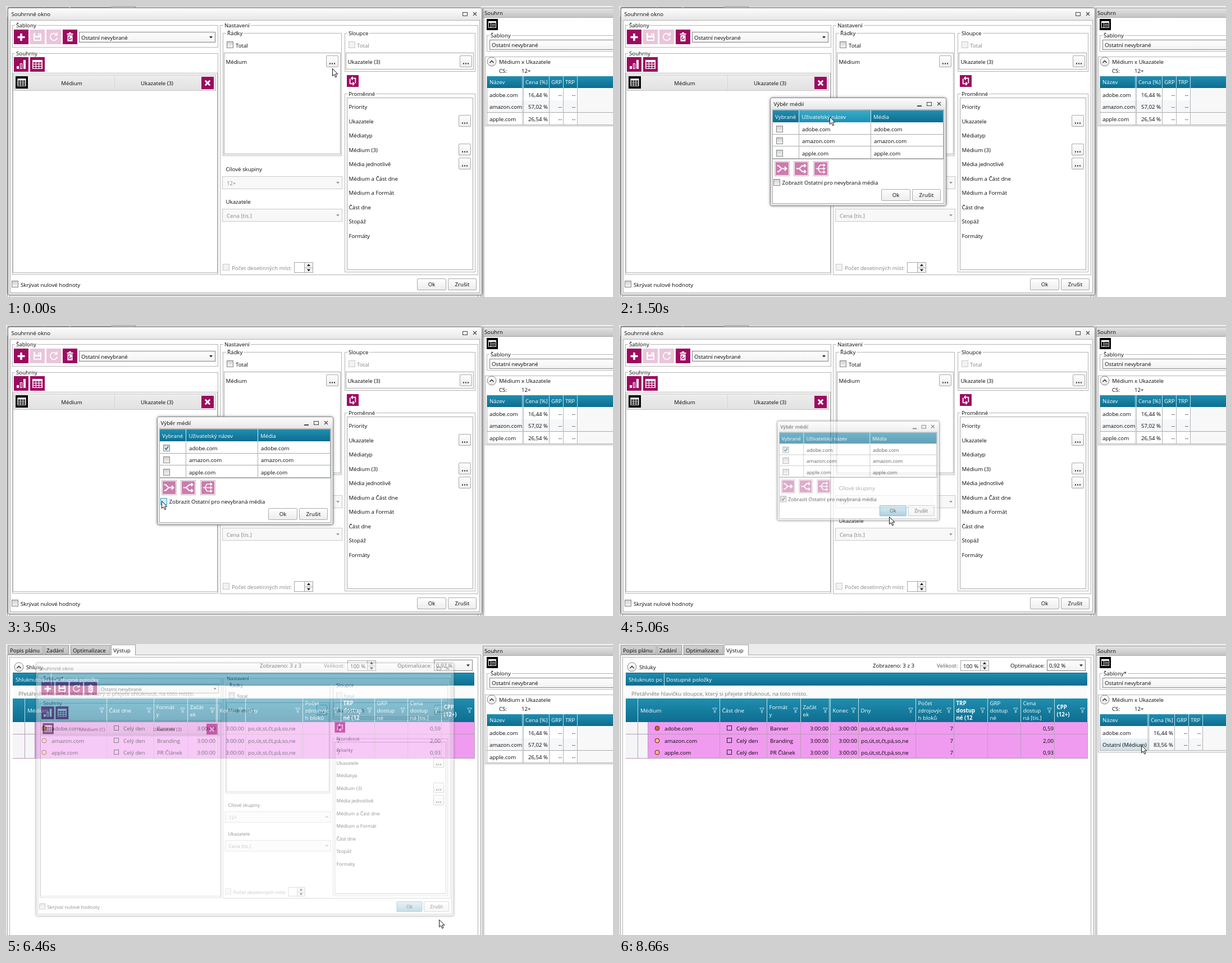
These frames come from a looping animation (1081 by 518 pixels, 8.92 s). An HTML page with a canvas:

```html
<!DOCTYPE html>
<html lang="cs">
<head>
<meta charset="utf-8">
<style>
html, body { margin: 0; width: 100%; height: 100%; overflow: hidden; background: #fff; }
canvas { display: block; }
</style>
</head>
<body>
<canvas id="stage" width="1081" height="518"></canvas>
<script>
const W = 1081, H = 518, LOOP = 8920;
const screen = document.getElementById('stage').getContext('2d');
const layer = document.createElement('canvas');
layer.width = W; layer.height = H;
const layerCtx = layer.getContext('2d');
let c = screen, pointer = [0, 0], modal = false;

const INK = '#080808', DIM = '#858585', LINE = '#b4b4b4', PLUM = '#9c0a60';
const SITES = ['adobe.com', 'amazon.com', 'apple.com'];

// Pointer stops: time, x, y
const PATH = [
  [190, 581, 111], [420, 578, 99], [1110, 578, 100], [1500, 375, 197], [1860, 286, 217],
  [2050, 284, 219], [2200, 283, 219], [2600, 283, 220], [3290, 278, 297], [3390, 269, 306],
  [3500, 277, 313], [4060, 277, 313], [4720, 481, 341], [5130, 481, 341], [5690, 818, 446],
  [5760, 816, 452], [6080, 766, 502], [6380, 766, 502], [6650, 786, 457], [6730, 789, 450],
  [7540, 930, 180], [7680, 931, 180], [8020, 966, 180], [8180, 966, 180], [8520, 931, 181], [8660, 930, 180]
];

const clamp = v => Math.max(0, Math.min(1, v));
const ramp = (t, a, b) => clamp((t - a) / (b - a));

function pointerAt(t) {
  const i = PATH.findIndex(p => p[0] > t);
  if (i === 0) return PATH[0].slice(1);
  if (i < 0) return PATH[PATH.length - 1].slice(1);
  const [t0, x0, y0] = PATH[i - 1], [t1, x1, y1] = PATH[i];
  const u = ramp(t, t0, t1), k = (u + u * u * (3 - 2 * u)) / 2;
  return [x0 + (x1 - x0) * k, y0 + (y1 - y0) * k];
}

const over = (x, y, w, h) => !modal && pointer[0] >= x && pointer[0] < x + w && pointer[1] >= y && pointer[1] < y + h;

function rect(x, y, w, h, fill, stroke) {
  if (fill) { c.fillStyle = fill; c.fillRect(x, y, w, h); }
  if (stroke) { c.strokeStyle = stroke; c.lineWidth = 1; c.strokeRect(x + .5, y + .5, w - 1, h - 1); }
}
function shade(y, h, top, bottom) {
  const g = c.createLinearGradient(0, y, 0, y + h);
  g.addColorStop(0, top); g.addColorStop(1, bottom);
  return g;
}
// y is the middle of the text line
function text(s, x, y, color = INK, align = 'left', weight = '') {
  c.font = `${weight} 9.7px "Open Sans", "Noto Sans", sans-serif`;
  c.textAlign = align;
  c.fillStyle = color;
  c.fillText(s, x, Math.round(y + 3.5));
}
function path(d, x, y, { stroke, fill, width = 1 }) {
  c.save();
  c.translate(x, y);
  const p = new Path2D(d);
  if (fill) { c.fillStyle = fill; c.fill(p); }
  if (stroke) { c.strokeStyle = stroke; c.lineWidth = width; c.stroke(p); }
  c.restore();
}
function group(x, y, w, h, label, lx) {
  rect(x, y, w, h, null, LINE);
  c.font = '9.7px "Open Sans", "Noto Sans", sans-serif';
  rect(lx - 2, y - 1, c.measureText(label).width + 4, 3, '#fff');
  text(label, lx, y);
}
function button(x, y, w, h, label, focus) {
  const hot = over(x, y, w, h);
  c.beginPath();
  c.roundRect(x + .5, y + .5, w - 1, h - 1, 1.5);
  c.fillStyle = hot ? shade(y, h, '#cfe4ec', '#82b6ca') : shade(y, h, '#fff', '#ececec');
  c.fill();
  c.strokeStyle = hot || focus ? '#2fa3cd' : '#a9a9a9';
  c.lineWidth = 1;
  c.stroke();
  if (label) return text(label, x + w / 2, y + h / 2, INK, 'center');
  for (let i = -1; i < 2; i++) rect(x + w / 2 - 1 + i * 4, y + h / 2 + 3, 2, 2, '#222');
}
function checkbox(x, y, checked, disabled) {
  const hot = !disabled && over(x, y, 12, 12);
  const fill = hot ? '#d5ecf7' : disabled ? '#f2f2f2' : shade(y, 12, '#cfcfcf', '#f6f6f6');
  rect(x, y, 12, 12, fill, hot ? '#2fa3cd' : disabled ? '#c8c8c8' : '#858585');
  if (checked) path('M3 6L5.2 8.6L9 3.2', x, y, { stroke: '#2b6b96', width: 1.6 });
}
function combo(x, y, w, h, label, disabled) {
  rect(x, y, w, h, disabled ? '#f8f8f8' : shade(y, h, '#fff', '#f1f1f1'), disabled ? '#c9c9c9' : '#828282');
  text(label, x + (disabled ? 8 : 4), y + h / 2 + .5, disabled ? DIM : INK);
  path('M-3 -1.5H3L0 2Z', x + w - 8, y + h / 2, { fill: disabled ? '#999' : '#222' });
}
function spinner(x, y, w, h, label) {
  rect(x, y, w, h, '#fff', '#a9a9a9');
  rect(x + w - 16, y, 16, h, '#f3f3f3', '#a9a9a9');
  rect(x + w - 16, y + h / 2, 16, 1, '#a9a9a9');
  path('M-3 2L0 -2L3 2Z', x + w - 8, y + 5, { fill: '#222' });
  path('M-3 -2L0 2L3 -2Z', x + w - 8, y + h - 4.5, { fill: '#222' });
  text(label, x + 5, y + h / 2 + .5);
}
function expander(x, y) {
  c.beginPath();
  c.arc(x, y, 8, 0, 7);
  c.fillStyle = shade(y - 8, 16, '#fff', '#e4e4e4');
  c.fill();
  c.strokeStyle = '#888'; c.lineWidth = 1;
  c.stroke();
  path('M-3.5 2L0 -1.5L3.5 2', x, y, { stroke: '#222', width: 1.3 });
}
function blue(x, y, w, h) {
  const hot = over(x, y, w, h) && c === layerCtx;
  rect(x, y, w, h, hot ? shade(y, h, '#38abc9', '#1c91b5') : shade(y, h, '#1f8eb0', '#0e6d90'));
}
const vline = (x, y, h, color) => rect(x, y, 1, h, color);

const ICONS = {
  plus: ['M13 7V20M6.5 13.5H19.5', 3.6],
  refresh: ['M18 9A6.3 6.3 0 1 0 19.2 14.5M19 5V10H14', 1.7],
  merge: ['M3 7H6L12 13H22M3 19H6L12 13M18 9L22 13L18 17', 2.2],
  split: ['M3 13H9L15 7H22M9 13L15 19H22M19 4L22 7L19 10M19 16L22 19L19 22', 2.2],
  triple: ['M3 13H21M7 13L11 6H21M7 13L11 20H21M18 3.5L21 6L18 8.5M18 10.5L21 13L18 15.5M18 17.5L21 20L18 22.5', 1.8],
  close: ['M8 8L18 18M18 8L8 18', 3.4],
  loop: ['M11 7H19V18M15 19H7V8M13 3.5L10 7L13 10.5M13 15.5L16 19L13 22.5', 2.2]
};
function icon(name, x, y, size = 26, color = PLUM) {
  rect(x, y, size, size, color);
  c.save();
  c.translate(x, y);
  c.scale(size / 26, size / 26);
  const white = { fill: '#fff' };
  if (ICONS[name]) path(ICONS[name][0], 0, 0, { stroke: '#fff', width: ICONS[name][1] });
  if (name === 'save') {
    path('M6 6H18L20 8V20H6Z', 0, 0, white);
    rect(9, 6, 8, 5, color); rect(14, 7, 2, 3, '#fff'); rect(8, 14, 10, 4, color);
  }
  if (name === 'trash') {
    path('M7.5 7H18.5V9H7.5ZM11 5H15V7H11ZM8.5 10H17.5V21H8.5Z', 0, 0, white);
    path('M13 13A2.3 2.3 0 1 0 15.3 15.3', 0, 0, { stroke: color, width: 1.3 });
  }
  if (name === 'bars') {
    path('M5 16H9V21H5ZM17 5H21V21H17Z', 0, 0, white);
    path('M11.5 11.5H14.5V20.5H11.5Z', 0, 0, { stroke: '#fff', width: 1.2 });
  }
  if (name === 'grid') {
    rect(4, 5, 18, 16, '#fff');
    for (let i = 0; i < 9; i++) rect(5.5 + i % 3 * 5.3, 9 + Math.floor(i / 3) * 4, 4.2, 2.8, color);
  }
  c.restore();
}

function frame(x, y, w, h, title, titleH) {
  c.save();
  c.shadowColor = 'rgba(0,0,0,.55)'; c.shadowBlur = 5;
  c.beginPath();
  c.roundRect(x + .5, y + .5, w - 1, h - 1, 3);
  c.fillStyle = shade(y, titleH, '#fefefe', '#e6e6e6');
  c.fill();
  c.restore();
  c.strokeStyle = '#8a8a8a'; c.lineWidth = 1;
  c.stroke();
  rect(x + 4, y + titleH, w - 8, h - titleH - 4, '#fff', '#b0b0b0');
  text(title, x + 6.5, y + 11.5);
  path('M-3 -3L3 3M3 -3L-3 3', x + w - 13, y + 11, { stroke: '#444', width: 1.2 });
  rect(x + w - 35, y + 8, 9, 7, null, '#444');
}

function mainGrid() {
  rect(0, 0, W, H, '#ececec');
  const tabs = [[3, 64, 'Popis plánu'], [68, 44, 'Zadání'], [115, 71, 'Optimalizace'], [187, 44, 'Výstup']];
  rect(2, 19, 844, 510, '#fff', '#a6a6a6');
  tabs.forEach(([x, w, label], i) => {
    const on = i === 3;
    rect(x, on ? 1 : 2, w, on ? 19 : 17, on ? '#fff' : shade(2, 17, '#d2d2d2', '#bdbdbd'), '#9c9c9c');
    if (on) rect(x + 1, 18, w - 2, 3, '#fff');
    text(label, x + 4, 11);
  });
  rect(6, 23, 835, 510, '#fff', '#b0b0b0');
  expander(23, 41);
  text('Shluky', 36, 41);
  text('Zobrazeno: 3 z 3', 452, 38);
  text('Velikost:', 566, 38, '#555');
  spinner(608, 29, 51, 19, '100 %');
  text('Optimalizace:', 697, 38);
  combo(762, 28, 69, 20, '0,92 %');

  blue(12, 51, 822, 23);
  text('Shluknuto po', 17, 63.5, '#fff');
  vline(80, 51, 23, '#d7edf4');
  text('Dostupné položky', 84, 63.5, '#fff');
  rect(12, 74, 822, 23, '#fbfbfb');
  text('Přetáhněte hlavičku sloupce, který si přejete shluknout, na toto místo.', 22, 88, '#777');
  blue(12, 97, 822, 42);

  const edges = [33, 179, 263, 323, 376, 426, 528, 596, 656, 715, 775, 834];
  const heads = ['Médium', 'Část dne', 'Formát|y', 'Začát|ek', 'Konec', 'Dny', 'Počet|zdrojovýc|h bloků',
    'TRP|dostup|né (12', 'GRP|dostup|né', 'Cena|dostup|ná [tis.]', 'CPP|(12+)'];
  heads.forEach((head, i) => {
    const lines = head.split('|');
    const bold = i === 7 || i === 10 ? 'bold' : '';
    lines.forEach((s, k) => text(s, edges[i] + (i ? 4.5 : 5), 118.5 + (k - (lines.length - 1) / 2) * 13, '#fff', 'left', bold));
    path('M-3.5 -4H3.5V-3L.8 -.5V4H-.8V-.5L-3.5 -3Z', edges[i + 1] - 8.5, 118, { stroke: '#d7edf4', width: .8 });
  });

  const formats = ['Banner', 'Branding', 'PR Článek'], prices = ['0,59', '2,00', '0,93'];
  SITES.forEach((site, i) => {
    const y = Math.round(139 + i * 21.5), m = y + 11.5;
    rect(12, y, 40, 22, '#f5f5f7');
    rect(52, y, 782, 22, '#f09bf0');
    rect(12, y + 21, 822, 1, '#b49ab6');
    c.beginPath();
    c.arc(68, m - .5, 4, 0, 7);
    c.fillStyle = i ? '#f6b48c' : '#c9663f';
    c.fill();
    c.strokeStyle = '#5a2c1c'; c.lineWidth = 1;
    c.stroke();
    text(site, 81, m);
    rect(192, m - 5.5, 9, 9, null, '#222');
    text('Celý den', 209, m);
    text(formats[i], 269, m);
    text('3:00:00', 373, m, INK, 'right');
    text('3:00:00', 424, m, INK, 'right');
    text('po,út,st,čt,pá,so,ne', 431, m);
    text('7', 595, m, INK, 'right');
    text(prices[i], 774, m, INK, 'right');
  });
  edges.forEach(x => { vline(x, 97, 42, '#bfe0eb'); vline(x, 139, 65, '#b9a0bb'); });
  vline(51, 139, 65, '#b9a0bb');
  vline(374, 97, 107, '#d9d0dc');
  rect(12, 51, 822, 1, '#0d6485');
}

function summaryPane(done) {
  rect(849, 3, 240, 520, '#fff', '#9a9a9a');
  rect(850, 4, 231, 17, shade(4, 17, '#e2e2e2', '#c2c2c2'));
  rect(849, 20, 232, 1, '#a8a8a8');
  rect(850, 21, 3, 500, '#e6e6e6');
  text('Souhrn', 852, 12);
  rect(856, 23, 20, 20, '#000');
  rect(859, 27, 14, 12, '#fff');
  rect(860, 30, 3, 8, '#000');
  rect(864, 30, 8, 8, '#000');
  rect(865, 32, 6, 1, '#fff'); rect(865, 35, 6, 1, '#fff');
  group(856, 52, 240, 29, done ? 'Šablony*' : 'Šablony', 863);
  combo(861, 60, 240, 18, 'Ostatní nevybrané');

  const rows = done ? [['adobe.com', '16,44 %'], ['Ostatní (Médium)', '83,56 %']]
    : SITES.map((s, i) => [s, ['16,44 %', '57,02 %', '26,54 %'][i]]);
  const shift = done ? 22 : 0, bottom = 147 + rows.length * 21.4;
  const edges = [921, 967, 992, 1017].map(x => x + shift);
  rect(853, 90, 240, Math.round(bottom) - 87, null, LINE);
  expander(865, 99);
  text('Médium x Ukazatele', 878, 99);
  text('CS:', 878, 115);
  text('12+', 918, 115);
  blue(856, 125, 230, 21);
  ['Název', 'Cena [%]', 'GRP', 'TRP'].forEach((s, i) => text(s, i ? edges[i - 1] + 4 : 861, 135.5, '#fff'));
  rows.forEach(([name, price], i) => {
    const y = Math.round(147 + i * 21.3), m = y + 11;
    if (i % 2) rect(856, y, 230, 21, '#f6f7f9');
    rect(edges[3], y, 90, 21, '#f8f8f8');
    const hot = [[857, edges[0] - 857], [edges[0] + 2, 44]].find(([x, w]) => over(x, y, w, 21));
    if (hot) rect(hot[0], y, hot[1], 21, shade(y, 21, '#edf4f8', '#cfe1eb'));
    text(name, 861, m);
    text(price, edges[1] - 2, m, INK, 'right');
    text('--', edges[2] - 2, m, INK, 'right');
    text('--', edges[3] - 3, m, INK, 'right');
    rect(856, y + 21, 230, 1, '#a9a9a9');
  });
  edges.forEach(x => { vline(x, 125, 21, '#bfe0eb'); vline(x, 146, bottom - 146, '#aeb4b8'); });
  vline(edges[0] - 2, 125, bottom - 125, '#c3ccd1');
  vline(856, 125, bottom - 125, '#a9a9a9');
}

function summaryWindow(edited) {
  frame(3, 3, 845, 512, 'Souhrnné okno', 22);
  const medium = edited ? 'Médium (1)' : 'Médium', pale = edited ? PLUM : '#e9c5da';
  group(11, 34, 367, 40, edited ? 'Šablony*' : 'Šablony', 18);
  ['plus', 'save', 'refresh', 'trash'].forEach((n, i) => icon(n, 14 + i * 29, 42, 26, i % 3 ? pale : PLUM));
  combo(130, 46, 243, 19, 'Ostatní nevybrané');
  group(11, 84, 367, 394, 'Souhrny', 18);
  icon('bars', 14, 91);
  icon('grid', 43, 91);
  rect(12, 119, 365, 356, null, LINE);
  rect(14, 122, 360, 29, shade(122, 29, '#ededed', '#e2e2e2'), '#c4c4c4');
  icon('grid', 17, 125, 22, '#000');
  text(medium, 117, 137, INK, 'center');
  vline(193, 123, 27, '#d6d6d6');
  text('Ukazatele (3)', 269, 137, INK, 'center');
  icon('close', 348, 126, 22);
  checkbox(10, 489);
  text('Skrývat nulové hodnoty', 26, 496);
  button(732, 485, 52, 21, 'Ok');
  button(787, 485, 51, 21, 'Zrušit');

  group(381, 34, 460, 445, 'Nastavení', 389);
  group(386, 48, 212, 219, 'Řádky', 394);
  checkbox(393, 63);
  text('Total', 409, 70);
  rect(388, 83, 208, 181, null, '#a6a6a6');
  text(medium, 391.5, 99);
  button(570, 88, 22, 21, '', edited);
  text('Cílové skupiny', 391.5, 290);
  combo(385, 303, 214, 23, '12+', true);
  text('Ukazatele', 391.5, 348);
  combo(385, 361, 214, 23, 'Cena [tis.]', true);
  checkbox(386, 459, false, true);
  text('Počet desetinných míst:', 402, 466, DIM);
  spinner(513, 456, 34, 19, '');

  group(603, 48, 233, 69, 'Sloupce', 610);
  checkbox(610, 63, false, true);
  text('Total', 625, 70, DIM);
  rect(605, 83, 228, 30, null, '#a6a6a6');
  text('Ukazatele (3)', 608.5, 99);
  button(808, 88, 22, 21);
  icon('loop', 607, 123, 21);
  group(603, 156, 233, 318, 'Proměnné', 610);
  rect(607, 163, 225, 307, null, '#a6a6a6');
  ['Priority', 'Ukazatele', 'Médiatyp', 'Médium (3)', 'Média jednotlivě', 'Médium a Část dne',
    'Médium a Formát', 'Část dne', 'Stopáž', 'Formáty'].forEach((s, i) => {
    const y = Math.round(179 + i * 25.55);
    text(s, 610.5, y);
    if ([1, 3, 4].includes(i)) button(806, y - 11, 22, 21);
  });
}

function mediaDialog(picked, others) {
  frame(269, 163, 314, 193, 'Výběr médií', 21);
  rect(531, 177, 8, 2, '#444');
  [[274, 46, 'Vybrané'], [321, 128, 'Uživatelský název'], [449, 128, 'Média']].forEach(([x, w, s], i) => {
    blue(x, 186, w, 21);
    text(s, x + (i === 1 ? 4.5 : 4), 197, '#fff');
  });
  SITES.forEach((site, i) => {
    const y = Math.round(207 + i * 21.4), m = y + 12;
    if (over(274, y, 303, 21)) rect(274, y, 303, 21, '#f1f7fa');
    checkbox(280, m - 6, picked && !i);
    text(site, 326, m);
    text(site, 454, m);
    rect(274, y + 21, 303, 1, '#a9a9a9');
  });
  [320, 448].forEach(x => { vline(x, 186, 21, '#d7edf4'); vline(x, 207, 65, '#aeaeae'); });
  rect(273, 185, 305, 88, null, '#a9b2b6');
  ['merge', 'split', 'triple'].forEach((n, i) => {
    const x = 277 + Math.round(i * 34.3);
    rect(x, 276, 27, 27, '#fff', '#c9b3c1');
    icon(n, x + 2, 278, 23, '#cb7dad');
  });
  checkbox(275, 308, others);
  text('Zobrazit Ostatní pro nevybraná média', 290.5, 314.4);
  button(467, 326, 52, 21, 'Ok');
  button(522, 326, 51, 21, 'Zrušit');
}

// Draws a window as one translucent, slightly shrunken picture
function popup(shown, cx, cy, draw) {
  if (shown <= 0) return;
  layerCtx.clearRect(0, 0, W, H);
  c = layerCtx;
  draw();
  c = screen;
  const k = .78 + .22 * shown;
  c.save();
  c.globalAlpha = shown;
  c.translate(cx, cy);
  if (shown < 1) c.scale(k, k);
  c.drawImage(layer, -cx, -cy);
  c.restore();
}

function render(t) {
  pointer = pointerAt(t);
  const dialog = Math.min(ramp(t, 760, 1080), 1 - ramp(t, 4930, 5300));
  const win = 1 - ramp(t, 6310, 6590);
  modal = win > 0;
  mainGrid();
  summaryPane(t >= 6500);
  modal = dialog > 0;
  popup(win, 425, 259, () => summaryWindow(t >= 5280));
  modal = false;
  popup(dialog, 427, 260, () => mediaDialog(t >= 2400, t >= 3700));
  path('M0 0V13L3 10.3L5.2 15.3L7.4 14.3L5.2 9.5H9.3Z', pointer[0] + .5, pointer[1] + .5, { fill: '#fff', stroke: '#111' });
}

function tick(now) {
  render(now % LOOP);
  requestAnimationFrame(tick);
}
requestAnimationFrame(tick);
</script>
</body>
</html>
```
